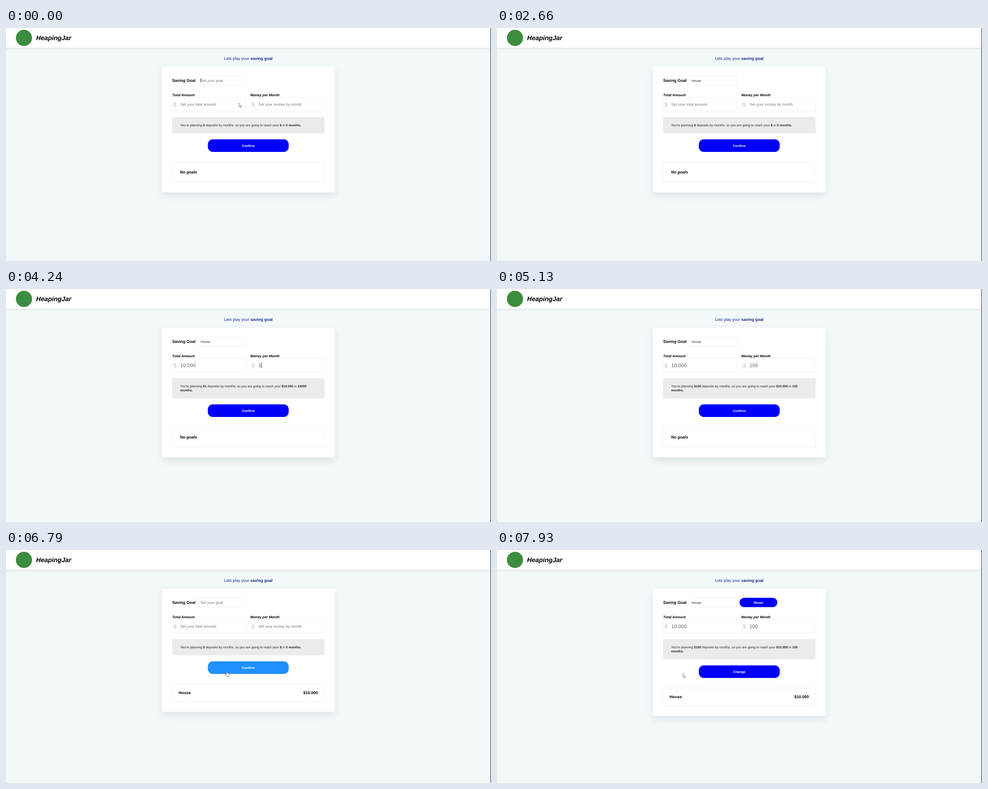
These frames come from a looping animation (1080x519 px, 8 s). An HTML page:

```html
<!DOCTYPE html>
<html lang="en">
<head>
<meta charset="utf-8">
<title>Savings form</title>
<style>
  html, body { margin: 0; height: 100%; overflow: hidden; background: #f3f8f9; }
  svg { display: block; width: 100vw; height: 100vh; }
  text { font: 9px "Liberation Sans", Arial, sans-serif; text-rendering: geometricPrecision; white-space: pre; }
  .bold { font-weight: bold; }
  .italic { font-weight: bold; font-style: italic; }
  .field { fill: #fff; stroke: #eef1f2; }
  .card { fill: #fff; filter: drop-shadow(0 7px 8px rgba(20, 50, 80, .1)); }
  .header { fill: #fff; filter: drop-shadow(0 1px 2px rgba(0, 0, 0, .12)); }
</style>
</head>
<body>
<svg viewBox="0 0 1080 519" preserveAspectRatio="none">
  <rect width="1080" height="519" fill="#f3f8f9"/>
  <rect class="header" x="-9" y="-9" width="1098" height="53"/>
  <circle cx="40" cy="22" r="18" fill="#3c8d3f"/>
  <text class="italic" x="67" y="27" style="font-size:14.4px">HeapingJar</text>
  <text x="485.5" y="71" fill="#17278c">Lets play your <tspan class="bold">saving goal</tspan></text>
  <g id="form"></g>
  <rect x="1079" width="1" height="519" fill="#111"/>
</svg>
<script>
const LOOP = 8000;
const form = document.getElementById('form');
const ruler = document.createElement('canvas').getContext('2d');

const fields = {
  goal:  { x: 433.3, base: 119.5, size: 7.5, hintBase: 119.5, hint: 'Set your goal', top: 112, height: 9, color: '#333' },
  total: { x: 388, base: 173.5, size: 11.25, hintBase: 173.3, hint: 'Set your total amount', top: 163, height: 13, color: '#5b646c' },
  month: { x: 562.3, base: 173.5, size: 11.25, hintBase: 173.3, hint: 'Set your money by month', top: 163, height: 13, color: '#5b646c' }
};

const empty = { goal: '', total: '', month: '', months: '0', caret: '' };
const filled = { goal: 'House', total: '10.000', month: '100', months: '100', caret: '' };

// Each change of the form: time, then the values that change.
const formSteps = [
  [0, { ...empty, caret: 'goal', saved: false, edit: false, hover: false }],
  [490, { caret: '' }], [970, { caret: 'goal' }],
  [1480, { goal: 'H' }], [1660, { goal: 'Ho' }], [1870, { goal: 'Hou' }],
  [1963, { goal: 'Hous' }], [2057, { goal: 'House' }], [2150, { caret: 'total' }],
  [2660, { caret: '' }], [2750, { total: '1', caret: 'total' }],
  [2960, { total: '10' }], [3040, { total: '100' }], [3240, { total: '1.000' }],
  [3630, { total: '10.000' }], [3920, { caret: 'month' }],
  [4240, { month: '1', months: '10000' }], [4420, { month: '10', months: '1000' }],
  [4530, { month: '100', months: '100' }],
  [5130, { caret: '' }], [5620, { caret: 'month' }],
  [5890, { hover: true }], [6077, { caret: '' }],
  [6310, { ...empty, caret: 'goal', saved: true }],
  [6790, { caret: '' }], [6880, { hover: false }], [7240, { caret: 'goal' }],
  [7440, { ...filled, edit: true }]
];

const pointerSteps = [
  [0, { x: 519, y: 167, shape: 'arrow' }],
  [100, { x: 410, y: 130 }], [300, { x: 385, y: 118 }], [395, { x: 340, y: 97 }],
  [490, { x: 285, y: 73 }], [585, { x: 228, y: 50 }], [680, { shape: '' }],
  [5890, { x: 535, y: 261, shape: 'hand' }], [5983, { x: 518, y: 264 }],
  [6077, { x: 505, y: 266 }], [6170, { x: 500, y: 266 }],
  [6790, { x: 491, y: 270 }], [6880, { x: 470, y: 283, shape: 'arrow' }],
  [6970, { x: 446, y: 296 }], [7060, { x: 427, y: 305 }], [7150, { x: 417, y: 310 }],
  [7240, { shape: '' }], [7440, { x: 405, y: 320, shape: 'arrow' }],
  [7590, { x: 405, y: 319 }], [7670, { x: 405, y: 315 }], [7750, { x: 406, y: 311 }],
  [7930, { x: 414, y: 275 }]
];

const shapes = {
  arrow: 'M0 0V9L2 7.2L3.5 10.4L4.9 9.8L3.5 6.7H6.2Z',
  hand: 'M0 .8Q1-.4 1.8 .8V4.2Q3-.1 3.4 4.6Q4.6 3.8 4.8 5Q6 4.6 6 6V8.5Q5.8 10 5 11.5H.5L-2.7 7.5Q-2.6 5.8-.9 7L0 7.8Z'
};

const stateAt = (steps, t) =>
  Object.assign({}, ...steps.filter(([start]) => start <= t).map(([, change]) => change));

const rect = (x, y, w, h, r, attrs) =>
  `<rect x="${x}" y="${y}" width="${w}" height="${h}" rx="${r}" ${attrs}/>`;

const text = (x, y, size, content, attrs = '') =>
  `<text x="${x}" y="${y}" style="font-size:${size}px" ${attrs}>${content}</text>`;

const bold = content => `<tspan class="bold">${content}</tspan>`;

function textWidth(content, size) {
  ruler.font = '100px "Liberation Sans", Arial, sans-serif';
  return ruler.measureText(content).width * size / 100;
}

function button(x, y, w, h, r, label, color) {
  return rect(x, y, w, h, r, `fill="${color}"`) +
    text(x + w / 2, y + h / 2 + 2.7, 7.5, label, 'class="bold" fill="#fff" text-anchor="middle"');
}

function fieldContent(name, state) {
  const f = fields[name], value = state[name];
  const content = value
    ? text(f.x, f.base, f.size, value, `fill="${f.color}"`)
    : text(f.x, f.hintBase, 8.44, f.hint, 'fill="#777"');
  const caretX = f.x + textWidth(value, f.size);
  const caret = state.caret === name ? rect(caretX, f.top, .9, f.height, 0, 'fill="#222"') : '';
  return content + caret;
}

function summary(s, wrapped) {
  const line = `You're planning ${bold('$' + s.month)} deposits by months, so you are going to reach your ` +
    `${bold('$' + s.total)} in ${bold(s.months + (wrapped ? '' : ' months.'))}`;
  return rect(370, 198.5, 339.5, wrapped ? 45 : 36, 2, 'fill="#ebebeb"') +
    text(387.7, 218.7, 7.2, line, 'fill="#222"') +
    (wrapped ? text(387.7, 227.7, 7.2, 'months.', 'class="bold" fill="#222"') : '');
}

function drawForm(s) {
  const wrapped = s.month !== '';
  const dy = wrapped ? 9 : 0;
  const listHeight = s.saved ? 39 : 44.5;
  const goals = s.saved
    ? text(384.3, 321.2 + dy, 9, 'House', 'class="bold"') +
      text(694.5, 321.2 + dy, 9, '$10.000', 'class="bold" text-anchor="end"')
    : text(387.5, 324 + dy, 9, 'No goals', 'class="italic"');
  return rect(347.3, 86.5, 384.8, 235 + listHeight + dy, 4, 'class="card"') +
    text(370, 119.7, 9, 'Saving Goal', 'class="bold"') +
    rect(427.5, 106.5, 106.5, 20.5, 2, 'class="field"') +
    text(370, 151.7, 7.875, 'Total Amount', 'class="italic"') +
    text(544, 151.7, 7.875, 'Money per Month', 'class="italic"') +
    rect(370, 154.5, 164.5, 30.2, 2, 'class="field"') +
    rect(544.5, 154.5, 165, 30.2, 2, 'class="field"') +
    [376.3, 550.5].map(x => text(x, 174.5, 13, '$', 'fill="#bfc5cb" text-anchor="middle"')).join('') +
    Object.keys(fields).map(name => fieldContent(name, s)).join('') +
    summary(s, wrapped) +
    button(449.5, 248 + dy, 180, 28, 11, s.edit ? 'Change' : 'Confirm', s.hover ? '#1e90ff' : '#0000f8') +
    (s.edit ? button(540, 106.5, 84.3, 20.7, 10.3, 'Reset', '#0000f8') : '') +
    rect(370.2, 298.7 + dy, 339, listHeight, 2, 'class="field"') + goals;
}

function drawPointer({ x, y, shape }) {
  if (!shape) return '';
  const stroke = shape === 'arrow' ? '#555' : '#333';
  return `<path transform="translate(${x} ${y})" d="${shapes[shape]}" fill="#fff" stroke="${stroke}" stroke-width=".7"/>`;
}

const start = performance.now();
function frame() {
  const t = (performance.now() - start) % LOOP;
  form.innerHTML = drawForm(stateAt(formSteps, t)) + drawPointer(stateAt(pointerSteps, t));
  requestAnimationFrame(frame);
}
frame();
</script>
</body>
</html>
```
